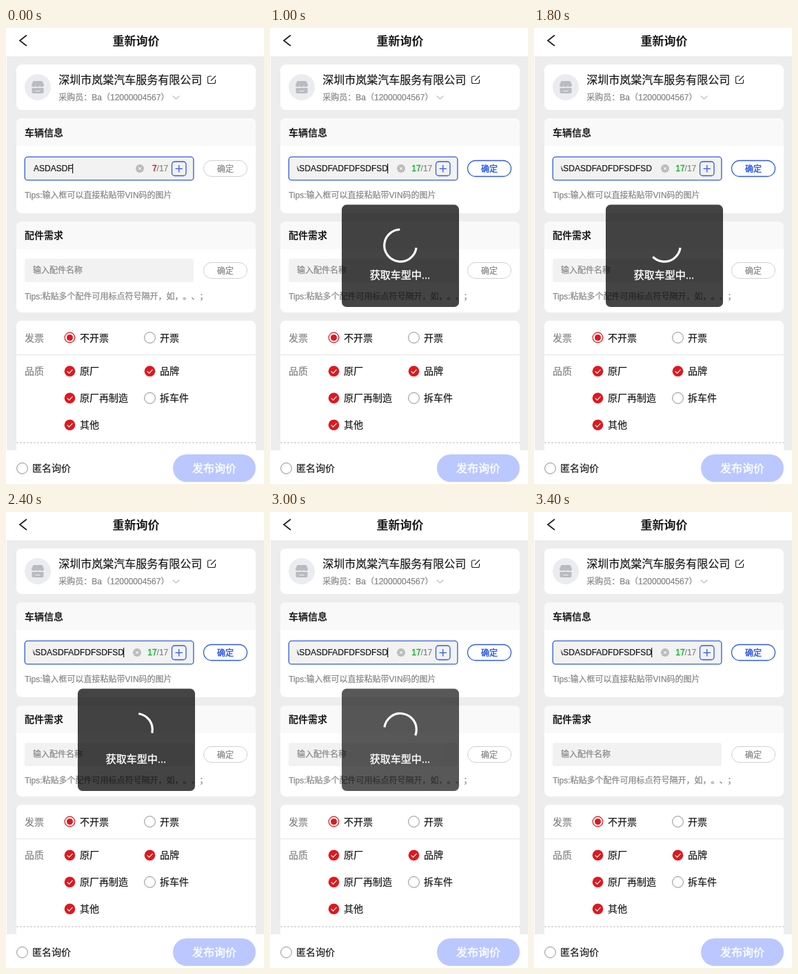
Recreate the animation shown at these times as an HTML page. Size 374x662 px, loop 3.6 s.

```html
<!DOCTYPE html>
<html lang="zh-CN">
<head>
<meta charset="utf-8">
<title>重新询价</title>
<style>
  html, body { margin: 0; width: 100%; height: 100%; overflow: hidden; background: #fff; }
  svg { display: block; }
  text, tspan { fill: currentColor; stroke: currentColor; }
  text {
    font: 12px "Liberation Sans", "Noto Sans CJK SC", "Noto Sans CJK", sans-serif;
    color: #858585; stroke-width: .22; white-space: pre; text-spacing-trim: space-all;
  }
  .m { font-size: 14px; }
  .dark { color: #1c1c1c; }
  .white { color: #fff; stroke-width: .4; }
  .bold { font-weight: 700; stroke-width: 0; }
  .mid { text-anchor: middle; }
  .line { fill: none; stroke: #222; }
  .card { fill: #fff; }
  .head { fill: #f9f9f9; }
  .field { fill: #f2f2f2; }
  .red { fill: #e1171e; }
  .blue { fill: none; stroke: #2f5ae8; stroke-width: 1.3; }
  .button rect { fill: #fff; stroke: #d0d0d0; }
  .button.on rect { stroke: #2f5ae8; stroke-width: 1.3; }
  .button.on text { color: #2453ee; stroke-width: .4; }
</style>
</head>
<body>
<svg width="374" height="662" viewBox="0 0 374 662">
  <defs>
    <circle id="off" r="7.9" fill="#fff" stroke="#8c8c8c"/>
    <g id="radio">
      <circle r="7.3" fill="#fff" stroke="#e1171e" stroke-width="1.2"/>
      <circle class="red" r="4.5"/>
    </g>
    <g id="check">
      <circle class="red" r="7.8"/>
      <path d="M-3.8 0L-1 2.8L4-2.4" fill="none" stroke="#fff" stroke-width="1.2"/>
    </g>
    <clipPath id="clip"><rect x="39.5" y="190" width="134" height="28"/></clipPath>
  </defs>

  <rect x="1" y="41" width="373" height="572" fill="#ededed"/>
  <path class="line" d="M30 10.5L20 18.3L30 26" stroke-width="1.8"/>
  <text class="dark bold mid" x="188.5" y="25" style="font-size:17px">重新询价</text>

  <rect class="card" x="15" y="53" width="347" height="66" rx="8"/>
  <circle cx="46" cy="86" r="19" fill="#ebecf0"/>
  <g fill="#b9bbc0">
    <path d="M39.5 77h13l2.5 5.5q0 3-3 3t-3-2q0 2-3 2t-3-2q0 2-3 2t-3-3z"/>
    <path d="M37.5 87h17v6q0 2-2 2h-13q-2 0-2-2z"/>
  </g>
  <path d="M42.5 91.5h7" stroke="#ebecf0"/>
  <text class="dark" x="76.3" y="80.8" style="font-size:16px">深圳市岚棠汽车服务有限公司</text>
  <path class="line" d="M298 70h-3.5q-2 0-2 2v6.5q0 2 2 2h7q2 0 2-2V75M297 76.5L304 69.5" stroke-width="1.1"/>
  <text x="76.3" y="104.8">采购员：Ba（12000004567）</text>
  <path d="M241.5 98.5L246.500 103L251.5 98.5" fill="none" stroke="#999"/>

  <rect class="card" x="15" y="131" width="347" height="138" rx="8"/>
  <path class="head" d="M15 171V139q0-8 8-8H354q8 0 8 8V171z"/>
  <text class="m dark bold" x="27" y="157.3">车辆信息</text>
  <rect class="field" x="27" y="187" width="245" height="34" rx="4"/>
  <rect class="blue" x="27.3" y="187.2" width="244.6" height="33.7" rx="4"/>
  <g clip-path="url(#clip)">
    <text class="dark" id="vin" y="208"></text>
    <rect id="caret" y="197" width="1.2" height="14" fill="#1c1c1c"/>
  </g>
  <g id="clear">
    <circle r="6" fill="#bcbcbc"/>
    <path d="M-2-2L2 2M-2 2L2-2" stroke="#fff"/>
  </g>
  <text x="235.3" y="208" text-anchor="end"><tspan id="count" stroke-width=".4"></tspan>/17</text>
  <rect class="blue" x="240.5" y="194" width="20.5" height="20.5" rx="4"/>
  <path class="blue" d="M245.5 204.300h10.5M250.750 199v10.5"/>
  <g class="button" id="confirm">
    <rect x="286.5" y="192.5" width="63" height="23" rx="11.5"/>
    <text class="mid" x="318" y="208.6">确定</text>
  </g>
  <text x="27" y="247.3">Tips:输入框可以直接粘贴带VIN码的图片</text>

  <rect class="card" x="15" y="281" width="347" height="132" rx="8"/>
  <path class="head" d="M15 321V289q0-8 8-8H354q8 0 8 8V321z"/>
  <text class="m dark bold" x="27" y="306.3">配件需求</text>
  <rect class="field" x="27" y="335" width="245" height="34" rx="3"/>
  <text x="39" y="356.3">输入配件名称</text>
  <g class="button">
    <rect x="286.5" y="340.5" width="63" height="23" rx="11.5"/>
    <text class="mid" x="318" y="356.6">确定</text>
  </g>
  <text x="27" y="394.3">Tips:粘贴多个配件可用标点符号隔开，如，。、；</text>

  <path class="card" d="M15 613V433q0-8 8-8H354q8 0 8 8V613z"/>
  <text class="m" x="27" y="454.5">发票</text>
  <use href="#radio" x="92.5" y="449.5"/>
  <text class="m dark" x="107" y="454.5">不开票</text>
  <use href="#off" x="208.5" y="449.5"/>
  <text class="m dark" x="223" y="454.5">开票</text>
  <path d="M15 474.5H362" stroke="#e4e4e4"/>
  <text class="m" x="27" y="503.3">品质</text>
  <use href="#check" x="92.5" y="498.3"/>
  <text class="m dark" x="107" y="503.3">原厂</text>
  <use href="#check" x="208.5" y="498.3"/>
  <text class="m dark" x="223" y="503.3">品牌</text>
  <use href="#check" x="92.5" y="537.3"/>
  <text class="m dark" x="107" y="542.3">原厂再制造</text>
  <use href="#off" x="208.5" y="537.3"/>
  <text class="m dark" x="223" y="542.3">拆车件</text>
  <use href="#check" x="92.5" y="576.3"/>
  <text class="m dark" x="107" y="581.3">其他</text>
  <path d="M15 602H362" stroke="#bbb" stroke-dasharray="3 2"/>

  <use href="#off" x="23.5" y="639.3"/>
  <text class="m dark" x="38" y="644.3">匿名询价</text>
  <rect x="242" y="619" width="120" height="40" rx="20" fill="#bbc8ff"/>
  <text class="mid white" x="302" y="645" style="font-size:16px">发布询价</text>

  <g id="toast">
    <rect x="104" y="256.6" width="170" height="148.4" rx="7" fill="#000" fill-opacity=".735"/>
    <circle id="spinner" cx="189" cy="315.8" r="23.3" pathLength="360" fill="none" stroke="#fff" stroke-width="3.2"/>
    <text class="mid white" x="188.5" y="364.2" style="font-size:15px">获取车型中...</text>
  </g>
</svg>
<script>
  const LOOP = 3600, STEP = 200, VIN = 'ASDASDFADFDFSDFSD';
  const typed = [7, 9, 10, 12, 14, 17];
  const $ = id => document.getElementById(id);
  const [vin, caret, clear, count, confirmButton, toast, spinner] =
    ['vin', 'caret', 'clear', 'count', 'confirm', 'toast', 'spinner'].map($);

  function draw(t) {
    const n = typed[Math.min(t / STEP, typed.length - 1)], full = n === VIN.length;
    vin.textContent = VIN.slice(0, n);
    const width = vin.getComputedTextLength();
    const x = Math.min(40, 171 - width);  // long input scrolls left
    vin.setAttribute('x', x);
    caret.setAttribute('x', Math.round(x + width - 0.6));
    caret.style.opacity = t < 1000 || t % 1000 < 500 ? 1 : 0;

    clear.setAttribute('transform', `translate(${n < 10 ? 194 : 190} 204)`);
    count.textContent = n;
    count.style.color = full ? '#19b32b' : '#d9141c';
    confirmButton.classList.toggle('on', full);

    toast.style.opacity = t < 1000 || t >= 3200 ? 0 : t < 3000 ? 1 : 0.89;
    const arc = 62 + Math.abs(t - 2200) * 0.165;
    spinner.setAttribute('stroke-dasharray', `${arc} ${360 - arc}`);
    spinner.setAttribute('transform', `rotate(${8 + (t - 1000) * 0.45} 189 315.8)`);
  }

  let last = -1;
  function tick() {
    const t = Math.floor(performance.now() % LOOP / STEP) * STEP;
    if (t !== last) draw(last = t);
    requestAnimationFrame(tick);
  }
  tick();
</script>
</body>
</html>
```
